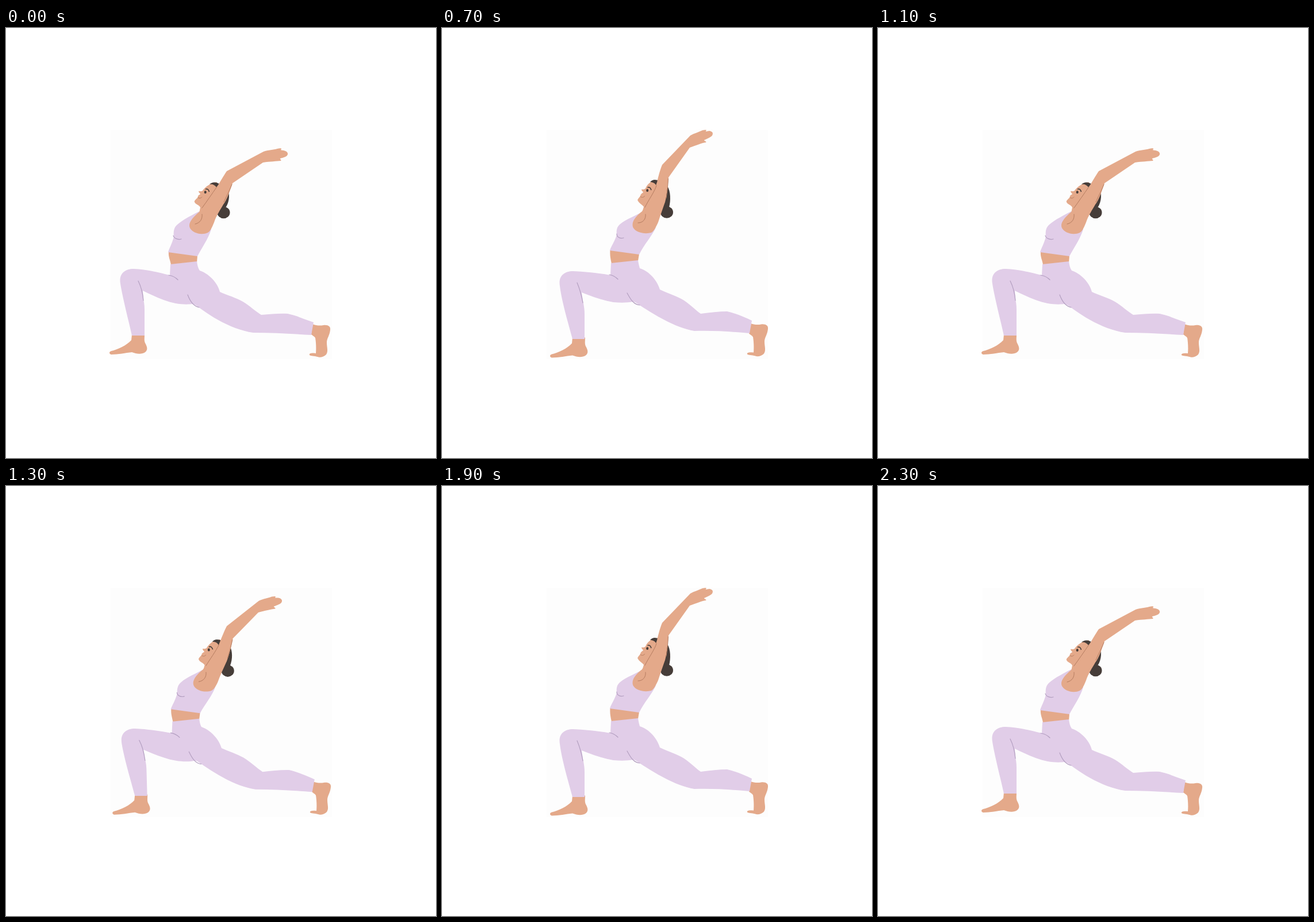
Recreate the animation shown at these times as an HTML page without scripts. Size 748x748 px, loop 2.4 s.

```html
<!DOCTYPE html>
<html lang="en">
<head>
<meta charset="utf-8">
<title>Crescent lunge</title>
<style>
html, body { margin: 0; width: 100%; height: 100%; overflow: hidden; background: #fff; }
svg { display: block; width: 100vw; height: 100vh; }

/* Stepped easing: 100 ms per drawing */
:root {
  --rise: linear(0 0% 33.33%, .333 33.33% 66.66%, .77 66.66% 100%);
  --sink: linear(0 0% 33.33%, .23 33.33% 66.66%, .667 66.66% 100%);
}

/* --a: low pose, --b: nearly up, --c: up */
.morph { d: var(--a); animation: morph 1.2s infinite; }
.shift { animation: shift 1.2s infinite; }
#reach { transform-origin: 350px 340px; animation: reach 1.2s step-end infinite; }

@keyframes morph {
  0% { d: var(--a); animation-timing-function: var(--rise); }
  25% { d: var(--b); animation-timing-function: step-end; }
  33.333% { d: var(--c); animation-timing-function: step-end; }
  66.667% { d: var(--b); animation-timing-function: var(--sink); }
  91.667%, 100% { d: var(--a); }
}
@keyframes shift {
  0% { translate: 0px 0px; animation-timing-function: var(--rise); }
  25% { translate: var(--b); animation-timing-function: step-end; }
  33.333% { translate: var(--c); animation-timing-function: step-end; }
  66.667% { translate: var(--b); animation-timing-function: var(--sink); }
  91.667%, 100% { translate: 0px 0px; }
}
@keyframes reach {
  0%, 58.333%, 100% { rotate: 0deg; }
  41.667% { rotate: -.45deg; }
}

.skin { fill: #e4a98a; }
.cloth { fill: #e1cde8; }
.hair { fill: #463d39; }
.seam, .crease { fill: none; stroke-width: 1.2; stroke-linecap: round; }
.seam { stroke: #b39fc0; }
.crease { stroke: #b57c60; stroke-width: 1; }

#nape {
  --a: path("M386 280C389 290 389 300 383 311L368 322L380 284Z");
  --b: path("M392 277C398 286 398 302 395 313L380 323L386 290Z");
  --c: path("M392 275C398 284 398 301 395 312L380 322L386 289Z");
}
#bun { --b: 12.5px 1px; --c: 12.5px -.5px; }
#face {
  --a: path("M356 271C351 274 345 278 342 283C339 285 336 283 335 284C335 286 338 288 338 289C335 291 333 292 334 294C330 299 327 300 328 303C330 307 335 307 338 312L336 322L350 330L375 280L366 268Z");
  --b: path("M363 270C359 273 356 276 354 281C351 284 348 282 347 283C347 285 350 287 350 288C347 290 345 291 345 293C342 298 339 299 341 302C343 306 347 306 351 311L348 321L362 330L384 280L376 266Z");
  --c: path("M363 268C359 271 356 274 354 279C351 282 348 280 347 281C347 283 350 285 350 286C347 288 345 290 345 292C342 297 339 298 341 301C343 305 347 306 351 311L348 321L362 330L383 278L376 264Z");
}
#fringe {
  --a: path("M354 272C358 268 364 267 371 271L366 277C363 273 359 271 354 272Z");
  --b: path("M362 270C366 265 372 265 378 268L373 277C371 272 367 270 362 270Z");
  --c: path("M362 268C366 263 372 263 377 266L373 275C371 270 367 268 362 268Z");
}
#eye { --b: 10.5px -1px; --c: 10.5px -3px; }
#mouth { --b: 11.5px 0px; --c: 11.5px -1.5px; }

#waist {
  --a: path("M283 389L333 396L332 408L287 412C286 404 282 398 283 389Z");
  --b: path("M290.5 386L341 393L339 405L293 410C291 401 290 395 290.5 386Z");
  --c: path("M292.5 386L343 393L341 405L295 410C293 401 292 395 292.5 386Z");
}
#top {
  --a: path("M336 319C325 325 308 333 298 342C292 347 291 354 292 363C289 375 284 383 282 390L333 397C340 383 352 367 357 350L345 330Z");
  --b: path("M347 320C337 326 320 332 309 341C303 346 302 352 302 360C298 372 293 380 290 387L341 394C350 377 365 362 370 347L356 330Z");
  --c: path("M348 320C338 326 321 332 310 341C304 346 303 352 304 360C300 372 294 380 292 387L343 394C351 377 366 361 372 347L357 330Z");
}
#bust {
  --a: path("M291 361C292 366 300 369 305 367");
  --b: path("M302 358C302 364 308 367 314 365");
  --c: path("M304 358C304 364 310 367 316 365");
}
#arm {
  --a: path("M384 249L448 215C456 212 465 212 472 210C476 209 480 209 479 211C476 212 479 213 483 213C488 214 491 217 490 220C489 224 483 225 477 227C476 229 480 229 478 231C470 232 460 232 447 234L394 270C390 282 384 300 378 307C373 316 366 326 362 338C358 348 355 354 351 356C340 361 325 357 320 348C316 340 324 330 336 320C347 306 360 288 368 275C374 265 378 258 384 249Z");
  --b: path("M384 240L434 189C441 185 449 183 455 180C459 179 464 179 461 181C460 183 464 181 467 181C473 182 474 185 472 189C470 192 464 194 458 197C458 199 463 199 461 201C453 202 445 206 433 210L395 262C394 274 391 292 388 304C385 312 380 326 375 338C372 347 366 354 362 356C351 359 337 356 332 348C327 339 335 328 347 319C358 306 374 278 376 266C378 258 380 250 384 240Z");
  --c: path("M383 238L432 187C439 183 447 181 453 178C457 177 462 177 459 179C458 181 462 179 465 179C471 180 472 183 470 187C468 190 462 192 456 195C456 197 461 197 459 199C451 200 443 204 431 208L394 260C393 272 391 291 388 303C385 311 380 326 376 338C372 347 368 354 364 356C353 359 338 356 333 348C328 339 336 328 348 319C358 305 373 276 375 264C377 256 379 248 383 238Z");
}
#inner {
  --a: path("M367 276C358 289 349 302 341 313");
  --b: path("M373 276C371 285 358 302 353 312");
  --c: path("M373 274C371 283 358 301 353 312");
}
#outer {
  --a: path("M393 272C388 285 383 293 379 303");
  --b: path("M394.5 264C394 275 393 285 390 297");
  --c: path("M393.5 262C393 273 392 284 390 296");
}
#pit {
  --a: path("M341 324C342 332 338 339 329 341");
  --b: path("M353 324C354 332 349 339 340 340");
  --c: path("M354 324C355 332 350 339 341 339");
}

#back { --b: 1.7px -1.7px; --c: 3px -1.5px; }
#front { --b: 9px 6.5px; --c: 8px 5.5px; }
#pants {
  --a: path("M286 411L332 406C333 413 334 418 337 422C352 427 368 442 372 459C385 465 400 469 412 476C424 483 434 493 444 499C460 498 475 496 490 497C505 500 520 507 535 512L531 534C498 532 465 530 430 530C395 525 360 505 330 482L325 480C318 481 305 481 295 479C275 475 255 465 238 457L239 472C241 480 241 488 241 494L241 535L219 535C213 508 203 470 199 445C196 428 206 419 222 419C245 420 265 425 285 430Z");
  --b: path("M292 409L339 404C340 411 341 414 342 417C358 423 372 438 377 454C391 460 402 464 414 470C427 478 438 489 448 496C464 494 480 492 494 492C508 495 524 502 538 509L534 531C500 528 470 526 437 526C402 521 366 497 334 476L330 476C322 479 308 479 296 477C278 474 258 467 240 460L243 474C246 483 247 491 247 499L249 542L228 542C219 512 207 475 203 450C200 433 210 424 226 424C249 425 270 427 291 430Z");
  --c: path("M294 409L341 404C342 411 343 414 344 418C360 423 374 438 379 455C392 461 404 465 416 471C429 478 440 490 450 497C466 495 482 493 496 493C510 496 526 503 539 509L535 531C502 528 472 526 439 527C404 521 368 498 336 477L332 476C324 478 310 478 298 477C280 474 260 467 243 460L245 474C247 483 248 491 248 498L248 541L227 541C219 512 208 474 205 449C202 432 212 423 228 423C250 424 272 426 293 430Z");
}
#hip {
  --a: path("M283 430C290 431 295 434 299 438");
  --b: path("M289 429C295 430 300 433 304 437");
  --c: path("M291 429C297 430 302 433 306 437");
}
#thigh {
  --a: path("M316 464C320 475 326 484 336 486");
  --b: path("M320 461C326 472 331 481 342 482");
  --c: path("M322 461C328 472 333 481 344 482");
}
#knee {
  --a: path("M230 440C235 450 238 462 239 474");
  --b: path("M233 444C239 455 242 467 244 480");
  --c: path("M235 443C240 455 243 466 245 478");
}
</style>
</head>
<body>
<svg viewBox="0 0 748 748">
  <rect x="182" y="177" width="385" height="399" fill="#fdfdfd"/>

  <path id="nape" class="morph hair"/>
  <ellipse id="bun" class="shift hair" cx="378.5" cy="321" rx="11" ry="10.3"/>
  <path id="face" class="morph skin"/>
  <path id="fringe" class="morph hair"/>
  <g id="eye" class="shift">
    <ellipse class="hair" cx="346.7" cy="285.5" rx="2" ry="2.6"/>
    <path d="M347 280.5C350 279 352.500 281 353.500 285" fill="none" stroke="#463d39" stroke-width="1.6"/>
  </g>
  <path id="mouth" class="shift crease" d="M334 295C337 297 339 296 341 294"/>

  <path id="waist" class="morph skin"/>
  <path id="top" class="morph cloth"/>
  <path id="bust" class="morph seam"/>
  <g id="reach">
    <path id="arm" class="morph skin"/>
    <path id="inner" class="morph crease"/>
    <path id="outer" class="morph crease"/>
    <path id="pit" class="morph crease"/>
  </g>

  <path id="back" class="shift skin" d="M533 515C540 518 547 518 552 517C560 516 565 519 564 525C563 535 558 540 558 547C558 556 561 562 557 568C553 572 546 574 542 572C536 570 530 571 528 569C527 566 531 565 539 566C540 556 539 545 538 539C536 536 533 535 531 533Z"/>
  <path id="front" class="shift skin" d="M219 533L241 533C241 540 240 543 242 548C246 555 247 560 242 564C236 568 227 567 219 564C208 565 195 568 183 568C179 567 179 563 183 562C195 559 210 552 218 543Z"/>
  <path id="pants" class="morph cloth"/>
  <path id="hip" class="morph seam"/>
  <path id="thigh" class="morph seam"/>
  <path id="knee" class="morph seam"/>
</svg>
</body>
</html>
```
